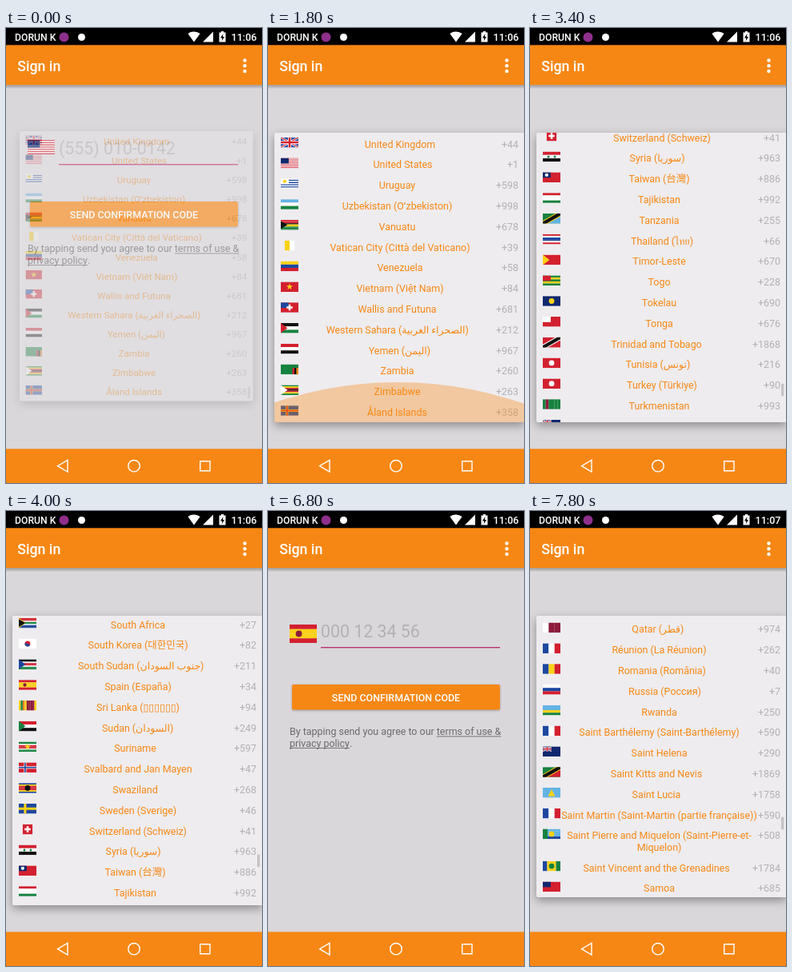
An HTML page with a canvas for the animation above (8 s loop, 320 px wide and 569 px high).

```html
<!DOCTYPE html>
<html lang="en">
<head>
<meta charset="utf-8">
<title>Sign in</title>
<style>
  html, body { margin: 0; height: 100%; overflow: hidden; background: #d9d7da; }
  canvas { display: block; width: 320px; height: 569px; }
</style>
</head>
<body>
<canvas id="stage"></canvas>
<script>
const LOOP = 8000, STEP = 200, ROW = 25.8, LINE = 14.4;
const ORANGE = '#f68714', TOP = 131, LEFT = 8, WIDTH = 313;
const STATUS_END = 21.3, BAR_END = 71.2, NAV_TOP = 526.3;
const TOTAL = 6274, BEFORE = 4454; // list length and the part above the first listed row
const FONT = "Roboto, 'Noto Sans', 'Noto Sans CJK KR', sans-serif";
const COLORS = { r: '#d3202f', w: '#fff', b: '#1d479f', y: '#fbd116', g: '#16823f', k: '#111',
  l: '#63b3e4', n: '#10286e', m: '#8c1a3b', o: '#ef8420' };

// name | calling code | flag layers; a slash in the name breaks the line
const COUNTRIES = `Qatar (قطر)|974|vwmm
Réunion (La Réunion)|262|vbwr
Romania (România)|40|vbyr
Russia (Россия)|7|hwbr
Rwanda|250|hllyg
Saint Barthélemy (Saint-Barthélemy)|590|vbwr
Saint Helena|290|hn j
Saint Kitts and Nevis|1869|hg /ryk
Saint Lucia|1758|hl ay
Saint Martin (Saint-Martin (partie française))|590|vbwr
Saint Pierre and Miquelon (Saint-Pierre-et-/Miquelon)|508|hlllb *y ig
Saint Vincent and the Grenadines|1784|vbyyg *g
Samoa|685|hr cn
San Marino|378|hwl *y
São Tomé and Príncipe|239|hgyg ^r
Saudi Arabia (المملكة العربية السعودية)|966|hg
Senegal (Sénégal)|221|vgyr *g
Serbia (Србија)|381|hrbw er
Seychelles|248|vbyrwg
Sierra Leone|232|hgwl
Singapore|65|hrw
Sint Maarten|1721|hrb ^w
Slovakia (Slovensko)|421|hwbr er
Slovenia (Slovenija)|386|hwbr
Solomon Islands|677|hbg
Somalia (Soomaaliya)|252|hl sw
South Africa|27|hrrrwggwbbb ^y ^k
South Korea (대한민국)|82|hw *rb
South Sudan (جنوب السودان)|211|hkkwrrwgg ^b
Spain (España)|34|hryyr em
Sri Lanka (▯▯▯▯▯▯)|94|vygoymmmmy
Sudan (السودان)|249|hrwk ^g
Suriname|597|hggwrrrwgg sy
Svalbard and Jan Mayen|47|hr +wb
Swaziland|268|hbyrrryb *k
Sweden (Sverige)|46|hb +y
Switzerland (Schweiz)|41|hr pw q
Syria (سوريا)|963|hrwk :g
Taiwan (台灣)|886|hr cn dw
Tajikistan|992|hrwwg
Tanzania|255|hg /lyk
Thailand (ไทย)|66|hrwbbwr
Timor-Leste|670|hr ^y
Togo|228|hgygyg cr
Tokelau|690|hn *y
Tonga|676|hr cw
Trinidad and Tobago|1868|hr /rwk
Tunisia (تونس)|216|hr *w
Turkey (Türkiye)|90|hr *w
Turkmenistan|993|vgmgggg
Turks and Caicos Islands|1649|hn j
Tuvalu|688|hl j
U.S. Virgin Islands|1340|hw *y
Uganda|256|hkyrkyr *w
Ukraine (Україна)|380|hby
United Arab Emirates (الإمارات العربية المتحدة)|971|hgwk ir
United Kingdom|44|J
United States|1|hrwrwrwrwrwrwr cn
Uruguay|598|hwbwbwbwbw cw dy
Uzbekistan (Oʻzbekiston)|998|hlwg
Vanuatu|678|hrrrkyyggg ^k
Vatican City (Città del Vaticano)|39|vyw q
Venezuela|58|hybr
Vietnam (Việt Nam)|84|hr sy
Wallis and Futuna|681|hr cb pw
Western Sahara (الصحراء الغربية)|212|hkwg ^r
Yemen (اليمن)|967|hrwk
Zambia|260|hg zrko
Zimbabwe|263|hgyrkryg ^w
Åland Islands|358|hb +yr`.split('\n').map(line => {
  const [name, code, flag] = line.split('|');
  return { lines: name.split('/'), code: '+' + code, flag };
});
let listEnd = 0;
for (const c of COUNTRIES) {
  c.top = listEnd;
  listEnd += ROW + (c.lines.length - 1) * LINE;
}
const find = name => COUNTRIES.find(c => c.lines[0].startsWith(name));
const SPAIN = find('Spain'), USA = find('United States');

const SCROLL = [[2000, 1458], [2200, 1448], [2600, 1406], [2800, 1330], [3000, 1200], [3400, 950],
  [3800, 735], [4000, 687], [4400, 674], [6800, 674], [7000, 763], [7200, 763], [7400, 600],
  [7600, 270], [7800, -4]];
const GLOW = [[800, 0], [1000, .2], [1400, .65], [1800, 1], [2200, 0]];

function track(points, t) {
  const i = points.findIndex(p => p[0] > t);
  if (i === 0) return points[0][1];
  if (i < 0) return points[points.length - 1][1];
  const [t0, a] = points[i - 1], [t1, b] = points[i];
  return a + (b - a) * (t - t0) / (t1 - t0);
}

const ratio = window.devicePixelRatio || 1;
function context(canvas) {
  canvas.width = 320 * ratio;
  canvas.height = 569 * ratio;
  const c = canvas.getContext('2d');
  c.scale(ratio, ratio);
  return c;
}
const screen2d = context(document.getElementById('stage'));
const layer2d = context(document.createElement('canvas'));
let ctx = screen2d; // all helpers draw here

function rect(color, x, y, w, h) {
  ctx.fillStyle = color;
  ctx.fillRect(x, y, w, h);
}
function disc(color, x, y, r, from = 0, to = 7) {
  ctx.fillStyle = color;
  ctx.beginPath();
  ctx.arc(x, y, r, from, to);
  ctx.fill();
}
function poly(color, ...pts) {
  ctx.fillStyle = color;
  ctx.beginPath();
  for (let i = 0; i < pts.length; i += 2) ctx.lineTo(pts[i], pts[i + 1]);
  ctx.closePath();
  ctx.fill();
}
function stroke(color, width, ...pts) {
  ctx.strokeStyle = color;
  ctx.lineWidth = width;
  ctx.beginPath();
  for (let i = 0; i < pts.length; i += 4) {
    ctx.moveTo(pts[i], pts[i + 1]);
    ctx.lineTo(pts[i + 2], pts[i + 3]);
  }
  ctx.stroke();
}
function text(str, x, y, color, size = 12.44, align = 'left', weight = 400) {
  ctx.font = `${weight} ${size}px ${FONT}`;
  ctx.textAlign = align;
  ctx.fillStyle = color;
  ctx.fillText(str, x, y);
  return ctx.measureText(str).width;
}
function raised(color, x, y, w, h, shadow, blur, drop) {
  ctx.save();
  ctx.shadowColor = `rgba(0,0,0,${shadow})`;
  ctx.shadowBlur = blur * ratio;
  ctx.shadowOffsetY = drop * ratio;
  ctx.fillStyle = color;
  ctx.beginPath();
  ctx.roundRect(x, y, w, h, 2);
  ctx.fill();
  ctx.restore();
}

function unionJack(w, h) {
  rect(COLORS.b, 0, 0, w, h);
  stroke('#fff', h * .2, 0, 0, w, h, 0, h, w, 0);
  stroke(COLORS.r, h * .08, 0, 0, w, h, 0, h, w, 0);
  stroke('#fff', h * .34, w / 2, 0, w / 2, h, 0, h / 2, w, h / 2);
  stroke(COLORS.r, h * .2, w / 2, 0, w / 2, h, 0, h / 2, w, h / 2);
}
function bands(cs, x, y, w, h) {
  cs.forEach((c, i) => rect(c, x + i * w / cs.length, y, w / cs.length, h));
}
const LAYERS = {
  h: (w, h, cs) => cs.forEach((c, i) => rect(c, 0, i * h / cs.length, w, h / cs.length)),
  v: (w, h, cs) => bands(cs, 0, 0, w, h),
  z: (w, h, cs) => bands(cs, w * .66, h * .35, w * .34, h * .65),
  c: (w, h, [c]) => rect(c, 0, 0, w * .45, h * .54),
  d: (w, h, [c]) => disc(c, w * .22, h * .27, h * .17),
  i: (w, h, [c]) => rect(c, 0, 0, w * .27, h),
  '^': (w, h, [c]) => {
    const inset = c === COLORS.k ? h * .12 : 0;
    poly(c, 0, inset, w * .38, h / 2, 0, h - inset);
  },
  a: (w, h, [c]) => poly(c, w * .3, h * .85, w / 2, h * .15, w * .7, h * .85),
  '*': (w, h, [c, low]) => {
    disc(c, w / 2, h / 2, h * .27);
    if (low) disc(low, w / 2, h / 2, h * .27, .3, Math.PI + .3);
  },
  ':': (w, h, [c]) => {
    disc(c, w * .32, h / 2, h * .12);
    disc(c, w * .68, h / 2, h * .12);
  },
  e: (w, h, [c]) => disc(c, w * .34, h / 2, h * .17),
  s: (w, h, [c]) => {
    const pts = [];
    for (let i = 0; i < 10; i++) {
      const r = h * (i % 2 ? .13 : .34), a = i * Math.PI / 5;
      pts.push(w / 2 + r * Math.sin(a), h / 2 - r * Math.cos(a));
    }
    poly(c, ...pts);
  },
  '+': (w, h, cs) => cs.forEach((c, i) =>
    stroke(c, h * (i ? .13 : .24), w * .36, 0, w * .36, h, 0, h / 2, w, h / 2)),
  p: (w, h, [c]) => stroke(c, h * .2, w / 2, h * .2, w / 2, h * .8, w / 2 - h * .3, h / 2, w / 2 + h * .3, h / 2),
  '/': (w, h, [low, edge, band]) => {
    poly(low, w, 0, w, h, 0, h);
    stroke(edge, h * .5, 0, h, w, 0);
    stroke(band, h * .34, 0, h, w, 0);
  },
  j: (w, h) => unionJack(w / 2, h / 2),
  J: unionJack,
};

function flag(spec, x, y, w, h) {
  const square = spec.endsWith(' q');
  ctx.save();
  ctx.translate(square ? x + (w - h) / 2 : x, y);
  if (square) w = h;
  ctx.beginPath();
  ctx.rect(0, 0, w, h);
  ctx.clip();
  for (const [kind, ...cs] of spec.split(' '))
    if (LAYERS[kind]) LAYERS[kind](w, h, cs.map(c => COLORS[c]));
  ctx.restore();
}

function form(t) {
  rect('#d9d7da', 0, 0, 320, 569);
  const spain = t >= 4800;
  if (spain) flag(SPAIN.flag, 27, 142, 34, 23);
  else flag(USA.flag, 27, 140, 34, 18);
  text(spain ? '000 12 34 56' : '(555) 010-0142', 66, 158, '#b3b1b4', 21.33);
  rect('#b8326f', 66, 170, 224, 1.4);
  if (t >= 5000 && t % 1000 < 600) rect('#c0309a', 66, 135, 1.3, 29);

  raised(ORANGE, 30, 217, 260, 31.5, .3, 3, 1);
  text('SEND CONFIRMATION CODE', 160, 237.5, '#fff', 12.44, 'center', 500);

  const grey = '#6b696c';
  const start = 27 + text('By tapping send you agree to our ', 27, 280, grey);
  rect(grey, start, 281.5, text('terms of use &', start, 280, grey), .9);
  const w = text('privacy policy', 27, 294.5, grey);
  rect(grey, 27, 296, w, .9);
  text('.', 27 + w, 294.5, grey);
}

function bars(t) {
  const shade = ctx.createLinearGradient(0, BAR_END, 0, BAR_END + 5);
  shade.addColorStop(0, 'rgba(0,0,0,.3)');
  shade.addColorStop(1, 'rgba(0,0,0,0)');
  rect(shade, 0, BAR_END, 320, 5);
  rect(ORANGE, 0, 20, 320, BAR_END - 20);
  rect('#000', 0, 0, 320, STATUS_END);
  rect(ORANGE, 0, NAV_TOP, 320, 569 - NAV_TOP);

  text('DORUN K', 11, 16, '#fff', 12.2, 'left', 500);
  disc('#8e2f8c', 72.5, 11.5, 6);
  disc('#fff', 94.5, 11.5, 4.5);
  ctx.fillStyle = '#fff';
  ctx.beginPath();
  ctx.moveTo(235, 17.5);
  ctx.arc(235, 17.5, 13, -2.2, -.94);
  ctx.fill();
  poly('#fff', 246, 17.5, 259, 17.5, 259, 4.5);
  rect('#fff', 266.5, 5.5, 8, 12);
  rect('#fff', 269, 4, 3, 2);
  poly('#000', 271.5, 7, 268, 12.5, 270.3, 12.5, 269.7, 16.5, 273, 11, 270.9, 11);
  text(t >= 7800 ? '11:07' : '11:06', 313.5, 16, '#fff', 12.6, 'right', 500);

  text('Sign in', 14.2, 54, '#fff', 17.78, 'left', 500);
  for (const y of [40.5, 47.2, 54]) disc('#fff', 298.5, y, 2.2);

  ctx.strokeStyle = '#fff';
  ctx.lineWidth = 1.4;
  ctx.beginPath();
  ctx.moveTo(77, 540.3);
  ctx.lineTo(64.5, 547.7);
  ctx.lineTo(77, 555.1);
  ctx.closePath();
  ctx.moveTo(167.2, 547.7);
  ctx.arc(160, 547.7, 7.2, 0, 7);
  ctx.rect(242.7, 541.7, 12.3, 12);
  ctx.stroke();
}

function row(c, y) {
  flag(c.flag, 16, y - 8.3, 22, 12.6);
  const codeWidth = text(c.code, LEFT + 305, y + 4.4, '#b2b0b3', 12.44, 'right');
  c.lines.forEach((line, i) =>
    text(line, (38 + 313 - codeWidth) / 2, y + 4.4 + i * LINE, ORANGE, 12.44, 'center'));
}

function list(t) {
  const height = t >= 7000 ? 352 : 362;
  const scroll = track(SCROLL, t), glow = track(GLOW, t);
  raised('#eeecef', LEFT, TOP, WIDTH, height, .36, 12, 4);
  ctx.save();
  ctx.beginPath();
  ctx.rect(LEFT, TOP, WIDTH, height);
  ctx.clip();
  for (const c of COUNTRIES) {
    const top = TOP + c.top - scroll;
    if (top < TOP - 50 || top > TOP + height) continue;
    if (c === SPAIN && t === 4800) rect('rgba(0,0,0,.1)', LEFT, top, WIDTH, ROW);
    row(c, top + ROW / 2);
  }
  if (t < 600 || t >= 2200 && t < 4800 || t >= 7000)
    rect('#c4c2c5', 314, TOP + 2 + height * (BEFORE + scroll) / TOTAL, 3.3, 15.5);
  if (glow) {
    ctx.fillStyle = `rgba(246,135,20,${.36 * glow})`;
    ctx.beginPath();
    ctx.ellipse(162, TOP + height + 430 * glow, 480, 480 * glow, 0, 0, 7);
    ctx.fill();
  }
  ctx.restore();
}

// The list is drawn on its own layer so that it fades as one sheet.
function popup(t) {
  if (t >= 5200 && t < 7000) return;
  const opening = t === 0 || t === 7000;
  ctx = layer2d;
  ctx.clearRect(0, 0, 320, 569);
  ctx.save();
  if (opening) {
    ctx.translate(17, 129);
    ctx.scale(.932, .932);
    ctx.translate(-LEFT, -TOP);
  }
  list(t);
  ctx.restore();
  ctx = screen2d;
  ctx.globalAlpha = opening || t === 5000 ? .36 : 1;
  ctx.drawImage(layer2d.canvas, 0, 0, 320, 569);
  ctx.globalAlpha = 1;
}

function draw(now) {
  const t = Math.floor(now % LOOP / STEP) * STEP;
  form(t);
  popup(t);
  bars(t);
}
const begin = performance.now();
function tick() {
  draw(performance.now() - begin);
  requestAnimationFrame(tick);
}
tick();
</script>
</body>
</html>
```
